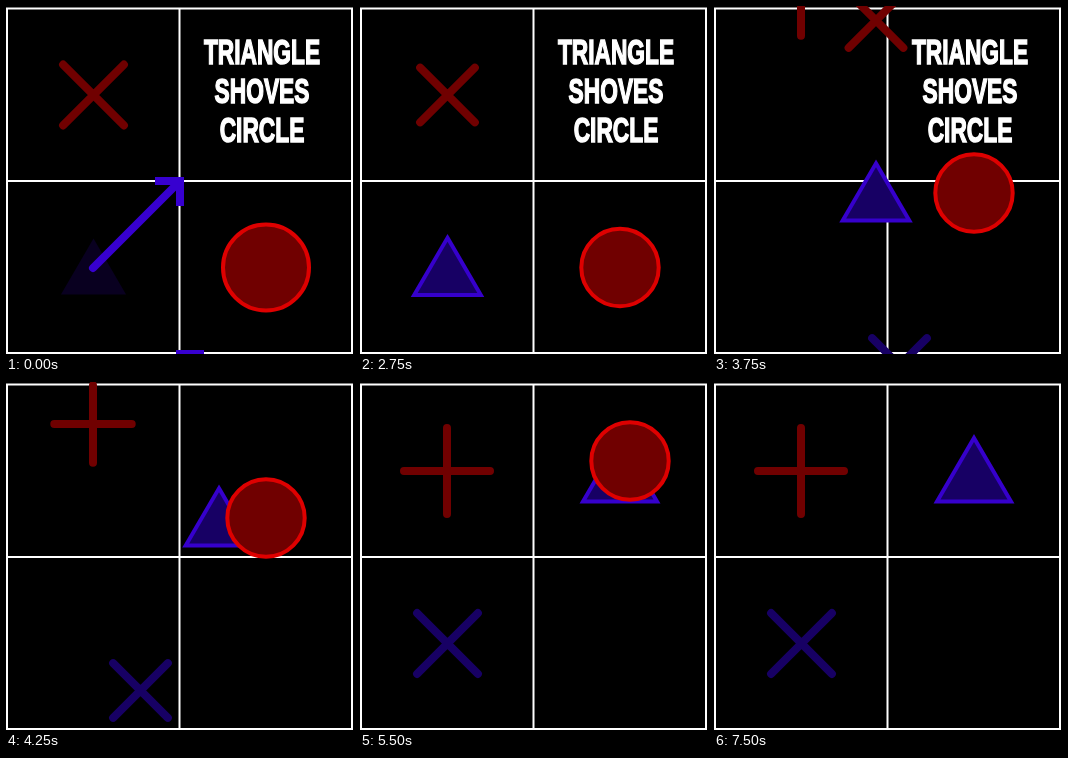
Write an HTML page that moves like this. It is 348 px wide and 348 px high and loops after 8000 ms.

```html
<!DOCTYPE html>
<html lang="en">
<head>
<meta charset="utf-8">
<title>Triangle shoves circle</title>
<style>
  html, body { margin: 0; width: 100%; height: 100%; overflow: hidden; background: #000; }
  svg { display: block; width: 348px; height: 348px; }
  .grid { stroke: #fff; stroke-width: 2; fill: none; }
  .bar { fill: none; stroke-width: 8; stroke-linecap: round; }
  .red { stroke: #700000; }
  .blue { stroke: #170064; }
  .arrow { fill: none; stroke: #3700d0; stroke-width: 8; stroke-linecap: round; }
  .head { stroke-linecap: square; stroke-linejoin: miter; }
  #tri { fill: #170064; stroke: #3600cc; stroke-width: 4; }
  #tri.dim { fill: #090020; stroke: none; }
  #ball { fill: #700000; stroke: #de0000; stroke-width: 4; }
  text {
    font: bold 35px "Liberation Sans", Arial, sans-serif;
    text-anchor: middle; fill: #fff; stroke: #fff; stroke-width: 1.6;
  }
</style>
</head>
<body>
<svg viewBox="0 0 348 348">
  <rect width="348" height="348" fill="#000"/>
  <path class="grid" d="M1 2V348M173.5 2V348M346 2V348M0 2.5H347M0 175H347M0 347H347"/>
  <g id="label" transform="translate(256 0) scale(.65 1)">
    <text y="58">TRIANGLE</text>
    <text y="97.5">SHOVES</text>
    <text y="136">CIRCLE</text>
  </g>
  <path id="redX" class="bar red"/>
  <path id="plus" class="bar red"/>
  <path id="blueX" class="bar blue"/>
  <path id="tri"/>
  <circle id="ball"/>
  <g id="arrows">
    <path class="arrow" d="M87 262L172 177M260 434L175 349"/>
    <path class="arrow head" d="M153 175H174V196M194 348H174V369"/>
  </g>
</svg>
<script>
const LOOP = 8000, STEP = 250, CELL = 172.5;
const SLIDE = [0, 21, 47, 74.5, 99.5, 125.5, 152, CELL];
const SHOVE = [0, 10, 36.5, 62.5, 86.5, 111.5, 138];
const $ = id => document.getElementById(id);
const [redX, plus, blueX, tri, ball, label, arrows] =
  ['redX', 'plus', 'blueX', 'tri', 'ball', 'label', 'arrows'].map($);

// Position in a list of steps that begins right after `start`
const at = (list, t, start) => {
  const i = Math.floor((t - start) / STEP);
  return list[Math.max(0, Math.min(list.length - 1, i))];
};

const cross = (x, y, r) => {
  const d = r * Math.SQRT1_2;
  return `M${x - d} ${y - d}L${x + d} ${y + d}M${x + d} ${y - d}L${x - d} ${y + d}`;
};
const plusPath = (x, y, r) => `M${x - r} ${y}H${x + r}M${x} ${y - r}V${y + r}`;
const triPath = (x, y, s) =>
  `M${x} ${y - 33.5 * s}L${x + 37 * s} ${y + 30 * s}H${x - 37 * s}Z`;
const show = (el, on) => el.setAttribute('visibility', on ? 'visible' : 'hidden');

function draw(t) {
  const plan = t < 2750;
  const small = !plan && t < 5250;
  const s = small ? 0.9 : 1;
  const r = 43 * s;
  const go = at(SLIDE, t, 3000);
  const left = CELL - go;
  const push = at(SHOVE, t, 5250);

  redX.setAttribute('d', cross(87.5 + go, 89 - go, r));
  plus.setAttribute('d', plusPath(87, 89 - left, r));
  blueX.setAttribute('d', cross(87.5 + left, 261.5 + left, r));
  tri.setAttribute('d', triPath(87.5 + go, 262 - go, plan ? 0.88 : s));
  tri.setAttribute('class', plan ? 'dim' : '');
  ball.setAttribute('cx', 260 + push);
  ball.setAttribute('cy', 261.5 - go - push);
  ball.setAttribute('r', plan ? 43 : 38.7);
  show(redX, go < CELL);
  show(blueX, go > 0);
  show(plus, go > 0);
  show(ball, t < 6750);
  show(label, t < 4000);
  show(arrows, plan);
}

const begin = performance.now();
function tick() {
  draw((performance.now() - begin) % LOOP);
  requestAnimationFrame(tick);
}
draw(0);
requestAnimationFrame(tick);
</script>
</body>
</html>
```
